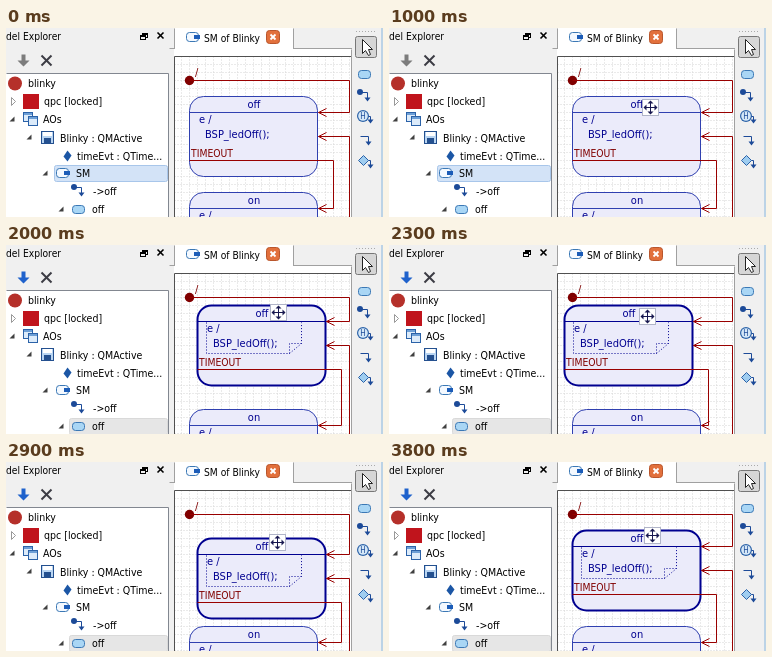
Animation of 377 by 189 pixels, one loop 6500 ms. Source, as an HTML page with a canvas:

```html
<!DOCTYPE html>
<html lang="en">
<head>
<meta charset="utf-8">
<title>State machine editor</title>
<style>
html, body { margin: 0; width: 100%; height: 100%; overflow: hidden; background: #f0f0f0; }
canvas { display: block; }
</style>
</head>
<body>
<canvas id="stage" width="377" height="189"></canvas>
<script>
const g = document.getElementById('stage').getContext('2d');
const LOOP = 6500, GRID = 8;
const NAVY = '#000090', BLUE = '#3040b0', RED = '#990000', MAROON = '#800000', ICON = '#1c4a98';
const FACE = '"DejaVu Sans Condensed", "Open Sans", "Noto Sans", sans-serif';

// Pointer path: time, x, y
const path = [
  [200, 384, 60], [300, 372, 62], [600, 312, 68], [900, 261, 79], [1400, 261, 79],
  [1600, 271, 74], [1700, 274, 73], [1900, 276, 67], [2100, 268, 66],
  [2300, 258, 71], [2500, 257, 78], [2700, 265, 83], [2900, 271, 80],
  [3200, 272, 75], [3400, 271, 73], [3500, 271, 73], [3800, 263, 73]
];

function pointerAt(t) {
  const i = path.findIndex(p => p[0] > t);
  if (i < 0) return path[path.length - 1].slice(1);
  if (i === 0) return path[0].slice(1);
  const [t0, x0, y0] = path[i - 1], [t1, x1, y1] = path[i];
  const k = (t - t0) / (t1 - t0);
  return [Math.round(x0 + (x1 - x0) * k), Math.round(y0 + (y1 - y0) * k)];
}

function box(x, y, w, h, color) {
  g.fillStyle = color;
  g.fillRect(x, y, w, h);
}

function frame(x, y, w, h, color) {
  g.strokeStyle = color;
  g.lineWidth = 1;
  g.strokeRect(x + .5, y + .5, w - 1, h - 1);
}

function text(s, x, y, size = 10.5, color = '#000', align = 'left') {
  g.font = `${size}px ${FACE}`;
  g.textAlign = align;
  g.fillStyle = color;
  g.fillText(s, x, y);
}

function trace(pts) {
  g.beginPath();
  for (let i = 0; i < pts.length; i += 2) g.lineTo(pts[i] + .5, pts[i + 1] + .5);
}

function line(pts, color, width = 1, dash = []) {
  trace(pts);
  g.setLineDash(dash);
  g.strokeStyle = color;
  g.lineWidth = width;
  g.stroke();
  g.setLineDash([]);
}

function poly(pts, color) {
  trace(pts);
  g.fillStyle = color;
  g.fill();
}

function disc(x, y, r, color) {
  g.beginPath();
  g.arc(x, y, r, 0, 7);
  g.fillStyle = color;
  g.fill();
}

function round(x, y, w, h, r, fill, stroke, width = 1) {
  g.beginPath();
  g.roundRect(x + .5, y + .5, w, h, r);
  g.fillStyle = fill;
  g.fill();
  g.strokeStyle = stroke;
  g.lineWidth = width;
  g.stroke();
}

function stateIcon(x, y) {
  round(x - 6, y - 4, 12, 8, 3, '#a9d6f5', '#3b78b5');
}

function machineIcon(x, y) {
  round(x - 7, y - 5, 12, 9, 3, '#f4f9ff', '#3b78b5');
  box(x + 1, y - 2, 6, 4, '#1b5cb8');
}

function linkIcon(x, y) {
  disc(x - 4, y - 3, 3, ICON);
  line([x - 4, y - 3, x + 3, y - 3, x + 3, y + 3], ICON);
  poly([x, y + 2, x + 6, y + 2, x + 3, y + 6], ICON);
}

function expander(x, y, open) {
  if (open) poly([x - 3, y + 2, x + 2, y + 2, x + 2, y - 3], '#404040');
  else {
    trace([x - 2, y - 4, x + 2, y, x - 2, y + 4, x - 2, y - 4]);
    g.fillStyle = '#fff';
    g.fill();
    g.strokeStyle = '#999';
    g.lineWidth = 1;
    g.stroke();
  }
}

function page(x, y) {
  box(x, y, 10, 10, '#dcebfa');
  frame(x, y, 10, 10, '#2b62a8');
  box(x + 1, y + 1, 8, 2, '#6d9fd6');
}

function explorer(picked) {
  box(0, 0, 167, 189, '#f0f0f0');
  text('del Explorer', 0, 12, 10.2);
  frame(136, 5, 6, 5, '#000');
  box(136, 5, 6, 2, '#000');
  box(134, 7, 6, 5, '#f0f0f0');
  frame(134, 7, 6, 5, '#000');
  box(134, 7, 6, 2, '#000');
  line([151, 4, 157, 10], '#000', 1.6);
  line([157, 4, 151, 10], '#000', 1.6);

  poly([15, 26, 19, 26, 19, 32, 23, 32, 17, 38, 11, 32, 15, 32], picked ? '#1f62cc' : '#7c7c7c');
  line([35, 27, 45, 37], '#3c3c44', 2);
  line([45, 27, 35, 37], '#3c3c44', 2);

  box(0, 45, 162, 144, '#fff');
  line([0, 45, 162, 45], '#828790');
  line([162, 45, 162, 189], '#828790');
  if (picked) round(63, 173, 98, 16, 2, '#e6e6e6', '#d9d9d9');
  else round(48, 137, 113, 16, 2, '#d3e3f7', '#a8c6ea');

  disc(9, 55.5, 7, '#b5302a');
  text('blinky', 22, 59);
  expander(7, 73, false);
  box(17, 66, 16, 15, '#c0141c');
  text('qpc [locked]', 38, 77);
  expander(6, 91, true);
  page(17, 84);
  page(22, 88);
  text('AOs', 37, 95);
  expander(23, 109, true);
  box(35, 103, 13, 13, '#b9d5f2');
  frame(35, 103, 13, 13, '#24508f');
  box(37, 104, 9, 4, '#fff');
  box(38, 110, 7, 5, '#24508f');
  text('Blinky : QMActive', 54, 113.5);
  poly([61, 122, 65, 127, 61, 133, 57, 128], '#1b56a5');
  text('timeEvt : QTime...', 71, 131.5);
  expander(39, 145, true);
  machineIcon(57, 145);
  text('SM', 70, 149);
  linkIcon(72, 162);
  text('->off', 87, 167);
  expander(55, 181, true);
  stateIcon(72, 181);
  text('off', 86, 185);
}

function tab() {
  box(163, 0, 214, 189, '#f0f0f0');
  box(168, 20, 177, 169, '#fff');
  line([163, 20, 377, 20], '#a0a0a0');
  box(169, 0, 118, 21, '#fff');
  line([168, 0, 168, 20], '#a0a0a0');
  line([287, 0, 287, 20], '#a0a0a0');
  machineIcon(187, 9);
  text('SM of Blinky', 198, 14, 10.2);
  round(260, 2, 13, 13, 3, '#e2703c', '#b9562c');
  line([264, 6, 269, 11], '#fff', 1.8);
  line([269, 6, 264, 11], '#fff', 1.8);
}

function tools() {
  box(346, 0, 31, 189, '#f0f0f0');
  line([345, 21, 345, 189], '#a0a0a0');
  box(375, 0, 2, 189, '#bcd3e6');
  for (let x = 350; x < 370; x += 3) box(x, 3, 1, 1, '#aaa');
  round(349, 8, 21, 21, 2, '#d6d6d6', '#777');
  arrow(356, 11, '#fff');
  stateIcon(358, 46);
  linkIcon(358, 67);
  disc(357, 88, 6, '#2b62a8');
  disc(357, 88, 4.8, '#d5e8f8');
  text('H', 357, 91, 8, ICON, 'center');
  line([362, 88, 364, 88, 364, 93], ICON);
  poly([361, 91, 367, 91, 364, 95], ICON);
  line([354, 108, 362, 108, 362, 114], ICON);
  poly([359, 113, 365, 113, 362, 117], ICON);
  const gem = [357, 127, 362, 132, 357, 137, 352, 132, 357, 127];
  poly(gem, '#9fcdf0');
  line(gem, '#2b62a8');
  line([362, 132, 364, 132, 364, 137], ICON);
  poly([361, 136, 367, 136, 364, 140], ICON);
}

function head(x, y) {
  line([x + 8, y - 4, x, y, x + 8, y + 4], RED);
}

function state(x, y, name, action, bold) {
  const edge = bold ? NAVY : BLUE;
  round(x, y, 128, 80, 14, '#ebebfa', edge, bold ? 2 : 1);
  line([x, y + 16, x + 128, y + 16], edge);
  text(name, x + 65, y + 12, 11, NAVY, 'center');
  text('e /', x + 10, y + 27, 11, NAVY);
  text(action, x + 16, y + 42, 11, NAVY);
}

function diagram(dx, dy, picked) {
  g.save();
  g.beginPath();
  g.rect(168, 28, 177, 161);
  g.clip();
  box(168, 28, 177, 161, '#fff');
  for (let x = 175; x < 345; x += GRID) line([x, 28, x, 189], '#d4d4d4', 1, [1, 2]);
  for (let y = 36; y < 189; y += GRID) line([168, y, 345, y], '#d4d4d4', 1, [1, 2]);
  line([168, 28, 345, 28], '#505050');
  line([168, 28, 168, 189], '#505050');

  state(183, 164, 'on', 'BSP_ledOn();', false);
  const x = 183 + dx, y = 68 + dy, r = x + 128;
  state(x, y, 'off', 'BSP_ledOff();', picked);
  if (picked) {
    line([x + 9, y + 17, x + 9, y + 48, x + 92, y + 48, x + 104, y + 38, x + 104, y + 17], NAVY, 1, [1, 2]);
    line([x + 92, y + 48, x + 92, y + 38, x + 104, y + 38], NAVY, 1, [1, 2]);
  }
  disc(183.5, 52.5, 4.7, MAROON);
  text('/', 189, 48, 11, MAROON);
  line([183, 52, 343, 52, 343, y + 16, r + 1, y + 16], RED);
  head(r + 1, y + 16);
  line([343, 189, 343, y + 40, r + 1, y + 40], RED);
  head(r + 1, y + 40);
  text('TIMEOUT', x + 2, y + 60.5, 10.3, MAROON);
  line([x, y + 64, x + 144, y + 64, x + 144, 180, 312, 180], RED);
  head(312, 180);
  g.restore();
}

function arrow(x, y, fill) {
  const pts = [x, y, x, y + 14, x + 3, y + 11, x + 6, y + 16, x + 8, y + 15, x + 6, y + 10, x + 10, y + 10, x, y];
  poly(pts, fill);
  line(pts, '#222');
}

function moveCursor(x, y) {
  const ink = '#181850';
  box(x - 8, y - 8, 17, 17, '#fff');
  frame(x - 8, y - 8, 17, 17, '#b0b4c8');
  line([x - 6, y, x + 6, y], ink);
  line([x, y - 6, x, y + 6], ink);
  for (const s of [-1, 1]) {
    poly([x + 4 * s, y - 3, x + 7 * s, y, x + 4 * s, y + 3], ink);
    poly([x - 3, y + 4 * s, x, y + 7 * s, x + 3, y + 4 * s], ink);
  }
}

function draw(t) {
  t = Math.floor(t / 100) * 100;
  const picked = t >= 1200;
  const [px, py] = pointerAt(t);
  const snap = v => Math.floor(v / GRID) * GRID;
  explorer(picked);
  tab();
  diagram(picked ? snap(px - 261) : 0, picked ? snap(py - 72) : 0, picked);
  tools();
  if (t >= 1000) moveCursor(px, py);
  else if (t >= 300) arrow(px - 5, py - 8, '#fff');
}

const start = performance.now();
function tick() {
  draw((performance.now() - start) % LOOP);
  requestAnimationFrame(tick);
}
tick();
</script>
</body>
</html>
```
